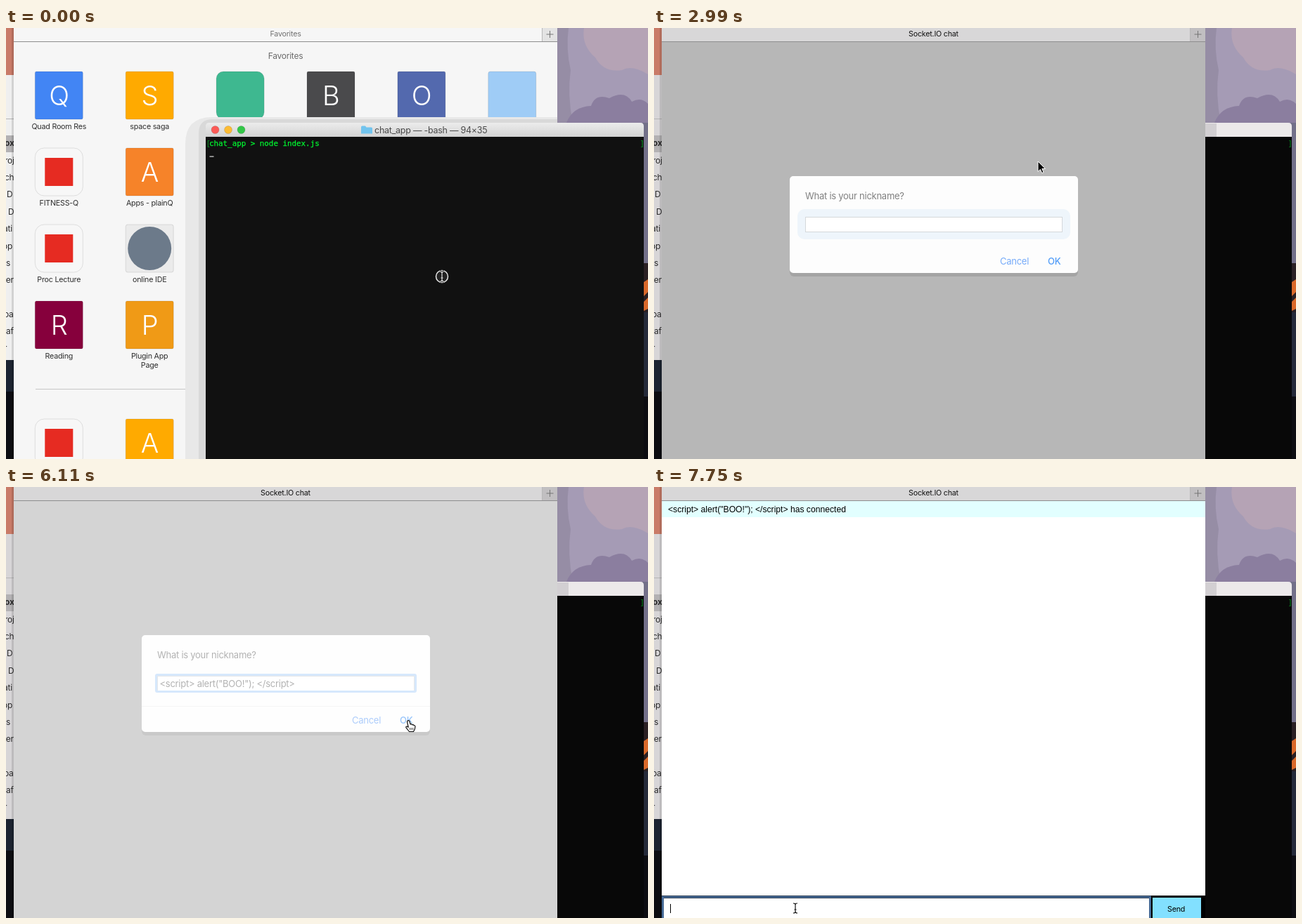
Recreate the animation shown at these times as an HTML page. Size 913x614 px, loop 8 s.

```html
<!DOCTYPE html>
<html lang="en">
<head>
<meta charset="utf-8">
<title>Chat app demo</title>
<style>
  html, body { margin: 0; width: 100%; height: 100%; overflow: hidden; background: #111; }
  svg { display: block; width: 913px; height: 614px; }
  text { font-family: Inter, Roboto, sans-serif; letter-spacing: -0.02em; white-space: pre; }
  .label { font-size: 10.7px; fill: #2e2e2e; text-anchor: middle; }
  .head { font-size: 12px; fill: #6b6b6b; text-anchor: middle; }
  .letter { font-size: 38px; font-weight: 350; fill: #fff; text-anchor: middle; }
  .side { font-size: 12px; fill: #2b2b2b; }
  .dialog { font-size: 13px; fill: #4b4b4b; }
  .title { font-size: 12.5px; fill: #4a4a4a; }
  .mono { font-family: "DejaVu Sans Mono", "Liberation Mono", monospace; font-size: 10.85px;
          letter-spacing: 0; fill: #00f530; stroke: #00f530; stroke-width: .25; }
  .chat { font-family: "Liberation Sans", Arial, sans-serif; font-size: 12.15px; letter-spacing: 0; fill: #000; }
</style>
</head>
<body>
<svg id="stage" viewBox="0 0 913 614" xmlns="http://www.w3.org/2000/svg"></svg>
<script>
const LOOP = 8000;
const NICK = '<script> alert("BOO!"); <\/script>';

const esc = s => s.replace(/&/g, '&amp;').replace(/</g, '&lt;').replace(/>/g, '&gt;');
const rect = (x, y, w, h, fill, more = '') =>
  `<rect x="${x}" y="${y}" width="${w}" height="${h}" fill="${fill}" ${more}/>`;
const path = (d, fill, more = '') => `<path d="${d}" fill="${fill}" ${more}/>`;
const circle = (x, y, r, fill, more = '') => `<circle cx="${x}" cy="${y}" r="${r}" fill="${fill}" ${more}/>`;
const text = (x, y, cls, s, more = '') => `<text x="${x}" y="${y}" class="${cls}" ${more}>${esc(s)}</text>`;
const group = (id, body, more = '') => `<g id="${id}" ${more}>${body}</g>`;

// A bookmark tile is either a letter tile or a plain coloured mark.
const letter = (label, color, char) => ({ label, color, char });
const plain = (label, color, radius = 3) => ({ label, color, radius });
const badge = (label, mark, color = '#f6f6f6', radius = 3, round = false) => ({ label, color, mark, radius, round });
const video = label => badge(label, '#e62b22', '#f7f7f7', 13);

const rows = [
  [62, [letter('Quad Room Res', '#4285f4', 'Q'), letter('space saga', '#ffaa00', 'S'),
    plain('CISC 2350|Chat', '#3eb890', 10), letter('Bookshelf', '#4a4a4c', 'B'),
    letter('OWASP Sec|Framework', '#5369ae', 'O'), plain('Forum Bikes', '#9fccf6')]],
  [171, [video('FITNESS-Q'), letter('Apps - plainQ', '#f68329', 'A'),
    plain('Puzzles', '#202020'), letter('Prep', '#9163d8', 'P'),
    badge('Reading Orchard', '#8fab3c', '#ecece6', 3, true), plain('Test Hidden Views', '#ffff00')]],
  [280, [video('Proc Lecture'), badge('online IDE', '#6c7a8a', '#ebebeb', 3, true),
    letter('WebWork', '#f8822b', 'W'), plain('Course Shelf', '#0fb0ff'),
    plain('Swift, phone,|Editor', '#41ad49', 14), badge('Citations', '#f15a29')]],
  [389, [letter('Reading', '#86003c', 'R'), letter('Plugin App|Page', '#f09a16', 'P')]],
  [557, [video(''), letter('', '#ffaa00', 'A'), plain('', '#4267b2'),
    plain('', '#9fccf6'), plain('', '#202020'), plain('', '#0077b5', 8)]]
];

function tile(t, col, y) {
  const cx = 75.3 + col * 128.9, x = cx - 34;
  let s = rect(x, y, 68, 68, t.color, `rx="${t.radius || 2}" stroke="#000" stroke-opacity=".1"`);
  if (t.char) s += text(cx, y + 47.5, 'letter', t.char);
  if (t.mark) s += t.round ? circle(cx, y + 34, 31, t.mark) : rect(cx - 20, y + 14, 40, 40, t.mark);
  return s;
}
const labels = (t, col, y) => t.label.split('|')
  .map((line, i) => text(75.3 + col * 128.9, y + 82 + i * 13, 'label', line)).join('');
const eachTile = draw => rows.map(([y, list]) => list.map((t, col) => draw(t, col, y)).join('')).join('');

function desktop() {
  const side = [['ox', -2, 168], ['roj', -2, 193], ['ch', -2, 217], ['D', 1, 241], ['e D', -7, 266], ['ati', -4, 290],
    ['op', -5, 315], ['s', 0, 339], ['ner', -7, 363], ['oa', -3, 412], ['af', 0, 436], ['r', -3, 460]];
  return rect(0, 0, 913, 614, '#0d0d11')
    + rect(0, 0, 11, 67, '#c97b68') + rect(0, 473, 11, 45, '#1d2431')
    + rect(0, 67, 11, 406, '#efefef', 'id="sidebar"') + rect(0, 129, 11, 1, '#b5b5b5') + rect(0, 153, 11, 24, '#b3b1b3')
    + `<g clip-path="url(#sideClip)">${side.map(([s, x, y], i) =>
        text(x, y, 'side', s, i ? '' : 'font-weight="700"')).join('')}</g>`
    + rect(8, 0, 3, 614, '#000', 'opacity=".12"')
    + rect(784, 0, 129, 340, '#a59bb5')
    + path('M822 0H913V66Q890 52 876 60Q850 64 838 42Q818 25 822 0Z', '#b5a3b5')
    + path('M784 0H800Q796 30 803 60Q798 95 806 135H784Z', '#968da5')
    + path('M797 135Q806 112 832 111Q838 93 858 100Q880 88 890 105Q903 98 913 108V140H797Z', '#8b7e9f')
    + path('M905 135H913V335Q906 340 905 350Z', '#737089')
    + rect(907, 335, 6, 70, '#2a2023') + path('M907 362l6 -4v18l-6 6zM907 390l6 -6v16l-6 3z', '#d9692a')
    + rect(907, 405, 6, 120, '#252a39');
}

function patches() {
  return rect(11, 20, 773, 594, '#d4d3d4')
    + path('M11 20H784V166C700 158 640 172 560 167H345C300 168 294 205 292 260V400C290 455 262 490 200 489Q110 491 11 480Z', '#e6e5e6')
    + path('M11 20H784V62Q730 66 690 90Q640 125 520 112Q420 110 340 130Q230 122 170 150Q112 175 112 487L11 480Z', '#efebec')
    + path('M112 250Q190 240 240 245Q270 310 240 390Q225 470 112 485Z', '#eeeeee');
}

function browser() {
  const favorites = rect(11, 20, 773, 594, '#f6f6f6') + group('patches', patches())
    + text(397.5, 44, 'head', 'Favorites') + rect(42, 514, 711, 1, '#c6c6c6')
    + text(397.5, 539, 'head', 'Frequently Visited', 'style="fill:#4c4c4c"')
    + group('tiles', eachTile(tile)) + eachTile(labels);
  const chat = rect(11, 20, 773, 594, '#fff')
    + group('message', rect(11, 20, 773, 23, '#e2ffff') + text(20, 35.5, 'chat', NICK + ' has connected'))
    + group('composer', rect(11, 582, 773, 32, '#000') + rect(14, 586, 690, 28, '#fff')
      + rect(12.5, 584, 693, 40, 'none', 'id="focus" stroke="#486c98" stroke-width="3"')
      + rect(23, 594, 1, 13, '#000', 'id="chatCaret"')
      + rect(709, 585, 69, 29, '#82e0ff') + text(730, 605, 'label', 'Send', 'style="text-anchor:start;fill:#000"'));
  return rect(11, 0, 773, 19, '#f6f6f6', 'id="bar"') + rect(762, 0, 22, 19, '#e3e3e3', 'id="plus"')
    + rect(762, 0, 1, 19, '#b9b9b9')
    + path('M768.5 9H778.5M773.5 4V14', 'none', 'stroke="#747474"')
    + text(397.5, 12.3, 'label', 'Favorites', 'id="tab"')
    + group('favorites', favorites) + group('chatPage', chat) + rect(11, 19, 773, 1, '#b9b9b9', 'opacity=".75"');
}

function dialog() {
  return rect(11, 20, 773, 594, '#000', 'opacity=".405"')
    + rect(193, 214, 410, 140, '#000', 'rx="6" opacity=".17"')
    + rect(193, 211, 410, 138, '#fdfdfd', 'rx="5"') + text(215, 244, 'dialog', 'What is your nickname?')
    + rect(193, 312, 410, 1, '#e8e8e8', 'id="dialogLine"')
    + rect(204, 258, 388, 43, '#e7f1fa', 'id="halo" rx="10"')
    + rect(215.5, 269.5, 365, 21, '#fff', 'stroke="#c2c8cd"')
    + rect(213.5, 267.5, 369, 24, 'none', 'id="inputFocus" rx="1.5" stroke="#a0c9fa" stroke-width="3"')
    + text(218.5, 285, 'dialog', NICK, 'id="nick"')
    + rect(217.5, 271, 1.2, 17, '#222', 'id="caret"')
    + text(492, 337, 'dialog', 'Cancel', 'style="fill:#3b87f7"')
    + text(560, 337, 'dialog', 'OK', 'style="fill:#0a74f5;font-weight:500"');
}

function terminal() {
  const shadow = (x, y, r, fill) => path(`M${x} 614V${y + r}Q${x} ${y} ${x + r} ${y}H784V614Z`, fill);
  const lights = ['#fc5b57', '#fdbc34', '#33c748'].map((c, i) =>
    circle(297.5 + i * 18.5, 145, 5.5, c, 'stroke="#000" stroke-opacity=".12"')).join('');
  const folder = path('M0 1.5Q0 0 1.5 0H6L7.5 2H14.5Q16 2 16 3.5V11H0Z', '#72c4ee', 'id="folder"');
  return shadow(255, 127, 38, '#e8e8e8') + shadow(274, 130, 20, '#d9d9d9')
    + path('M284 155V140Q284 135 289 135H902Q907 135 907 140V155Z', 'url(#chrome)') + rect(284, 155, 623, 459, '#111')
    + lights + circle(297.5, 145, 2, '#6d100d', 'id="dot"')
    + folder + text(524, 149.5, 'title', '', 'id="title"')
    + group('ghost', `<use href="#tiles" clip-path="url(#ghostClip)" opacity=".065"/>`
      + path('M784 300Q810 262 835 275Q880 270 907 320V364H784Z', '#8d6a98', 'opacity=".06"')
      + path('M790 285Q830 310 820 364H800Q785 330 790 285ZM850 320Q890 310 895 364H860Z', '#000', 'opacity=".3"'))
    + text(289, 168, 'mono', 'chat_app > node index.js')
    + text(284.5, 168, 'mono', '[', 'opacity=".5"') + text(901.5, 168, 'mono', ']', 'opacity=".5"')
    + text(289, 181, 'mono', 'listening on *:3000', 'id="listening"')
    + rect(289.5, 182.5, 6, 1.2, '#ddd', 'id="prompt"');
}

const backTerminal = path('M784 155V135H902Q907 135 907 140V155Z', '#ece9ea') + rect(784, 136, 16, 19, '#d2cfd2')
  + rect(784, 155, 123, 459, '#080808') + text(901.5, 168, 'mono', ']', 'opacity=".45"');

const beam = (color, edge) => ['stroke="' + edge + '" stroke-width="3"', 'stroke="' + color + '" stroke-width="1.2"']
  .map(s => path('M-3 -7Q0 -7 0 -5Q0 -7 3 -7M0 -5V5M-3 7Q0 7 0 5Q0 7 3 7M-1.5 2H1.5', 'none', s)).join('');
const pointers = {
  arrow: path('M0 0V14.5L3.4 11.4L5.7 16.6L8 15.6L5.8 10.5H10.4Z', '#000', 'stroke="#fff" stroke-width="1"'),
  hand: path('M4 0.7Q5.6 .5 6 2L7 6Q9 5 9.5 6.8Q11.5 6 12 7.7Q13.8 7.3 14 9.2L13.3 13L11.5 16.5H5.5L1 10.8Q.3 9.2 2 9L4.2 10.2L2.5 2.5Q2.5 1 4 .7Z',
    '#fff', 'stroke="#111" stroke-width="1.2" stroke-linejoin="round"')
    + path('M6.5 11V14M8.7 11V14M10.8 11V14', 'none', 'stroke="#222" stroke-width=".8"'),
  ring: circle(0, 0, 8.5, '#222', 'stroke="#e8e8e8" stroke-width="1.5"') + beam('#eee', '#111'),
  lightBeam: beam('#eee', '#111'),
  darkBeam: beam('#111', '#fff'),
  none: ''
};
const pointerId = name => 'pointer-' + name;

document.getElementById('stage').innerHTML = `<defs>
  <linearGradient id="chrome" x2="0" y2="1"><stop stop-color="#ececec"/><stop offset="1" stop-color="#d3d3d3"/></linearGradient>
  <clipPath id="sideClip"><rect width="11" height="614"/></clipPath>
  <clipPath id="ghostClip"><rect x="284" y="156" width="500" height="208"/></clipPath></defs>`
  + desktop() + group('back', backTerminal) + browser() + group('dialog', dialog())
  + group('front', terminal())
  + Object.entries(pointers).map(([name, body]) => group(pointerId(name), body)).join('');

const el = id => document.getElementById(id);
const show = (id, on) => el(id).setAttribute('display', on ? 'inline' : 'none');
const set = (id, name, value) => el(id).setAttribute(name, value);
const place = (id, x, y) => set(id, 'transform', `translate(${x} ${y})`);
const hold = (keys, t) => keys.reduce((last, key) => t >= key[0] ? key : last);
const within = (t, a, b) => t >= a && t < b;

const pointerKeys = [
  [0, 620, 354, 'ring'], [150, 620, 354, 'lightBeam'], [740, 614, 305, 'lightBeam'], [885, 598, 185, 'lightBeam'],
  [1030, 579, 86, 'arrow'], [1330, 553, 58, 'arrow'], [1630, 516, 29, 'arrow'], [2990, 546, 190, 'arrow'],
  [3280, 576, 301, 'arrow'], [3580, 0, 0, 'none'], [4930, 491, 311, 'arrow'], [5080, 500, 316, 'arrow'],
  [5220, 525, 325, 'arrow'], [5370, 550, 331, 'arrow'], [5510, 568, 332, 'hand'],
  [6850, 390, 455, 'arrow'], [7000, 228, 566, 'arrow'], [7300, 212, 590, 'darkBeam'], [7450, 201, 600, 'darkBeam']
];
const frontKeys = [[0, 1], [1920, 0.35], [2070, 0]];
const dialogKeys = [[0, 0], [2990, 0.7], [3140, 1], [5960, 0.8], [6110, 0.42], [6260, 0.1], [6400, 0]];

function render(t) {
  const active = t >= 1920, chatting = t >= 2990, running = t >= 150;

  set('sidebar', 'fill', active ? '#d7d5d7' : '#efefef');
  set('bar', 'fill', chatting ? '#d8d7d8' : active ? '#d0cecf' : '#f6f6f6');
  set('plus', 'fill', active ? '#c1bfc1' : '#e3e3e3');
  el('tab').textContent = chatting ? 'Socket.IO chat' : 'Favorites';
  el('tab').style.fill = active ? '#111' : '#707070';
  show('patches', active);
  show('favorites', !chatting);
  show('chatPage', chatting);
  show('back', active);

  set('front', 'opacity', hold(frontKeys, t)[1]);
  show('front', t < 2070);
  show('dot', running);
  place('folder', running ? 485 : 505, 139.5);
  set('folder', 'opacity', running ? 0.65 : 1);
  set('title', 'x', running ? 503 : 524);
  el('title').textContent = `chat_app — ${running ? 'node index.js' : '-bash'} — 94×35`;
  show('listening', t >= 440);
  set('prompt', 'y', t < 440 ? 182.5 : 195.5);
  show('prompt', t < 1630);
  show('ghost', t >= 1780);

  set('dialog', 'opacity', hold(dialogKeys, t)[1]);
  show('dialog', within(t, 2990, 6400));
  show('halo', t < 3280);
  show('inputFocus', t >= 3280);
  show('dialogLine', t >= 3280);
  show('nick', t >= 4180);
  set('caret', 'x', t < 4180 ? 217.5 : 410.5);
  show('caret', within(t, 3140, 3580) || within(t, 3730, 4180) || within(t, 4330, 4930));

  show('composer', t >= 6400);
  show('message', t >= 6550);
  show('focus', t >= 7600);
  show('chatCaret', t >= 7750);

  const [, x, y, shape] = hold(pointerKeys, t);
  for (const name in pointers) show(pointerId(name), name === shape);
  place(pointerId(shape), x, y);
}

const start = performance.now();
function tick(now) {
  render(Math.max(0, now - start) % LOOP);
  requestAnimationFrame(tick);
}
render(0);
requestAnimationFrame(tick);
</script>
</body>
</html>
```
